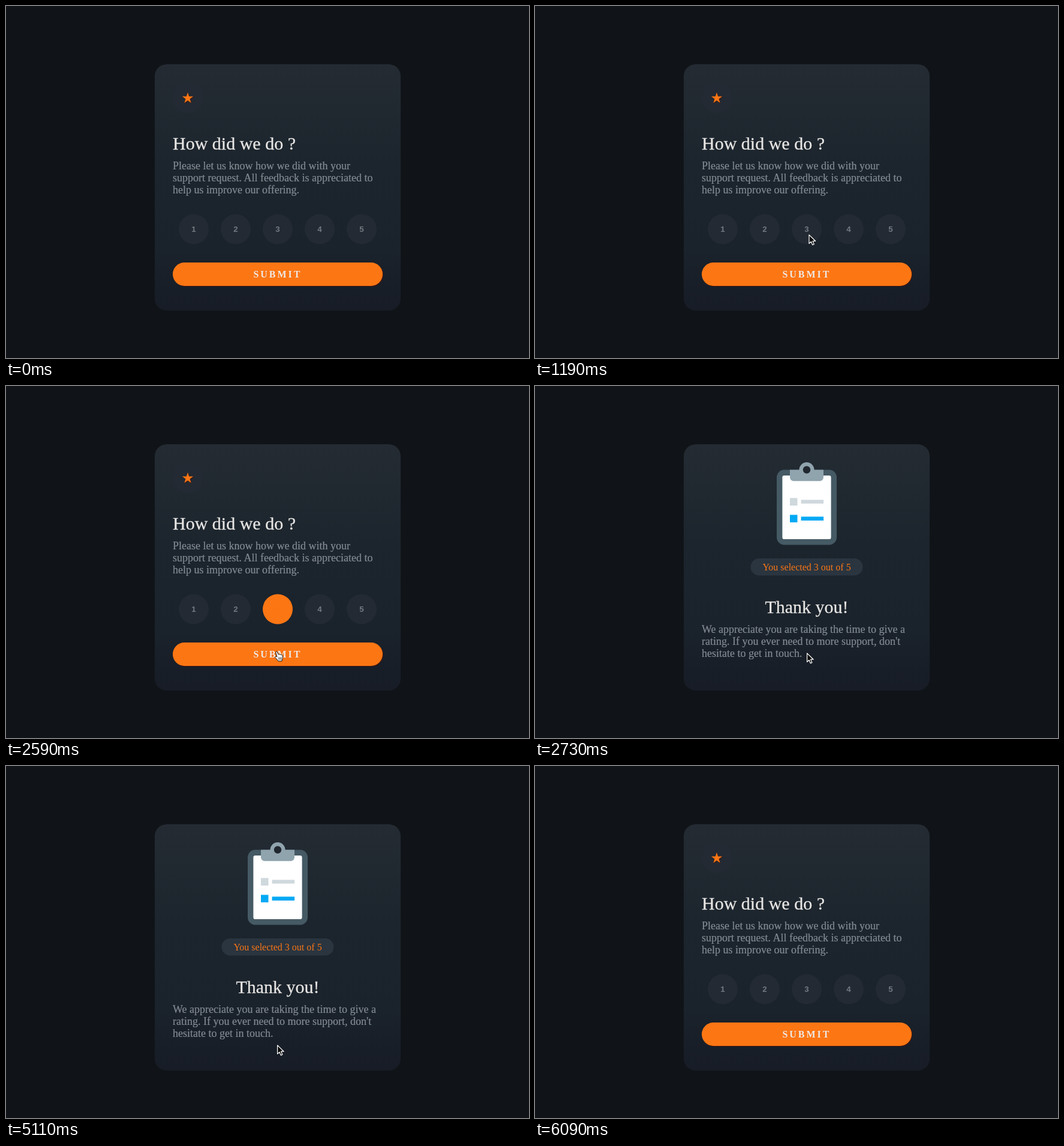
An HTML page that plays this animation: 872 px wide and 586 px high, repeating every 6370 ms.

```html
<!DOCTYPE html>
<html lang="en">
<head>
<meta charset="utf-8">
<title>Rating card</title>
<style>
  html, body { margin: 0; width: 100%; height: 100%; overflow: hidden; background: #101418; }
  svg { display: block; width: 100vw; height: 100vh; }
  text { font-family: "Liberation Serif", "Times New Roman", serif; white-space: pre; }
  .title { font-size: 30px; fill: #e8e6e4; stroke: #e8e6e4; stroke-width: .3px; }
  .body { font-size: 18px; fill: #838a93; stroke: #838a93; stroke-width: .2px; }
  .digit { font: bold 13.33px "Liberation Sans", Arial, sans-serif; text-anchor: middle; }
  .submit { font-size: 16px; font-weight: bold; letter-spacing: 3px; fill: #eeeae6; }
  .pill { font-size: 16px; fill: #fc7614; text-anchor: middle; }
</style>
</head>
<body>
<svg viewBox="0 0 872 586">
  <defs>
    <linearGradient id="cardFill" x1="0" y1="0" x2="0" y2="1">
      <stop offset="0" stop-color="#242b33"/>
      <stop offset=".4" stop-color="#1c252d"/>
      <stop offset=".76" stop-color="#1a222b"/>
      <stop offset="1" stop-color="#171c26"/>
    </linearGradient>
    <filter id="shade" x="-20%" y="-20%" width="140%" height="140%" color-interpolation-filters="sRGB">
      <feDropShadow dx="1" dy="1" stdDeviation=".6" flood-color="#4a140c" flood-opacity=".8"/>
    </filter>
  </defs>
  <rect width="872" height="586" fill="#101418"/>
  <rect x="248" y="97" width="410" height="410" rx="20" fill="url(#cardFill)"/>

  <g id="form">
    <circle cx="303" cy="153" r="25" fill="#232a33"/>
    <polygon id="star" fill="#fc7614" filter="url(#shade)"/>
    <text class="title" x="278" y="239">How did we do ?</text>
    <g id="ask" class="body"></g>
    <g id="ratings"></g>
    <rect x="278" y="427" width="350" height="39" rx="19.5" fill="#fc7614" filter="url(#shade)"/>
    <text class="submit" x="412.4" y="452">SUBMIT</text>
  </g>

  <g id="thanks">
    <rect x="403" y="139.5" width="100" height="125" rx="12.5" fill="#455a64"/>
    <rect x="412.4" y="148.9" width="81.2" height="106.2" rx="3.1" fill="#fff"/>
    <g fill="#90a4ae">
      <path d="M425 139.5h56v12.5a6.2 6.2 0 0 1-6.2 6.2h-43.6a6.2 6.2 0 0 1-6.2-6.2z"/>
      <circle cx="453" cy="139.5" r="12.5"/>
    </g>
    <circle cx="453" cy="139.5" r="6.2" fill="#20272f"/>
    <path d="M425 186.4h12.5v12.5H425zM443.6 189.5h37.5v6.3h-37.5z" fill="#cfd8dc"/>
    <path d="M425 214.5h12.5v12.5H425zM443.6 217.6h37.5v6.3h-37.5z" fill="#03a9f4"/>
    <rect x="359.5" y="287" width="187" height="28.5" rx="14.25" fill="#2a3540"/>
    <text class="pill" x="453" y="307">You selected 3 out of 5</text>
    <text class="title" x="453" y="378" text-anchor="middle">Thank you!</text>
    <g id="reply" class="body"></g>
  </g>

  <g id="pointer">
    <path id="arrow" d="M.6 .9V15.4L4 12.2 6.3 17.6 8.9 16.5 6.6 11.2H11.2Z"
      fill="#0a0a0a" stroke="#fff" stroke-width="1.2" stroke-linejoin="round"/>
    <g id="hand" transform="translate(-5 -3)" stroke="#111" stroke-linejoin="round" stroke-linecap="round">
      <path d="M3.9 9.8L1.8 3C1.3 1 3.8 .1 4.5 2L6 6.1C6.7 5 8.2 5.2 8.5 6.4C9.3 5.5 10.7 5.8 11 7C11.9 6.3 13.2 6.8 13.2 8.2V11.4C13.2 13 12.2 14 12 16.9H5.6C5 14.8 2.8 13.2 1 11.2C-.1 9.8 1.7 8.6 2.8 9.4Z" fill="#fff"/>
      <path d="M6.8 10.8v3.6M8.8 10.8v3.6M10.8 10.8v3.6" fill="none" stroke-width=".8"/>
    </g>
  </g>
</svg>
<script>
const LOOP = 6370, STEP = 70, SENT = 2730, RELOADED = 5600;
const $ = id => document.getElementById(id);

function add(parent, tag, attrs, text = "") {
  const node = document.createElementNS("http://www.w3.org/2000/svg", tag);
  for (const key in attrs) node.setAttribute(key, attrs[key]);
  node.textContent = text;
  return parent.appendChild(node);
}

function addLines(parent, y, lines) {
  lines.forEach((line, i) => add(parent, "text", { x: 278, y: y + 20 * i }, line));
}

addLines($("ask"), 272, [
  "Please let us know how we did with your",
  "support request. All feedback is appreciated to",
  "help us improve our offering."
]);
addLines($("reply"), 411, [
  "We appreciate you are taking the time to give a",
  "rating. If you ever need to more support, don't",
  "hesitate to get in touch."
]);

$("star").setAttribute("points", Array.from({ length: 10 }, (_, i) => {
  const r = i % 2 ? 3.67 : 9.6, a = i * Math.PI / 5;
  return [303 + r * Math.sin(a), 153.5 - r * Math.cos(a)].map(v => v.toFixed(2));
}).join(" "));

const ratings = [1, 2, 3, 4, 5].map(n => {
  const x = 243 + 70 * n;
  return {
    disc: add($("ratings"), "circle", { cx: x, cy: 371.5, r: 25, fill: "#232a33" }),
    digit: add($("ratings"), "text", { x, y: 376, class: "digit", fill: "#727981" }, n)
  };
});

const within = (t, from, to) => t >= from && t < to;
const progress = (t, from, to) => Math.min(1, Math.max(0, (t - from) / (to - from)));
const mix = (a, b, k) => a.map((v, i) => v + (b[i] - v) * k);
const show = (node, on) => node.setAttribute("visibility", on ? "visible" : "hidden");

// Each move starts where the last one ended; via bends it
const entry = [459, 600];
const moves = [
  { from: 140, to: 840, end: [438, 455] },
  { from: 840, to: 1330, via: [463, 379], end: [454, 369] },
  { from: 2030, to: 2310, end: [453, 444] },
  { from: 4130, to: 4620, via: [446, 482], end: [409, 592] },
  { from: 4620, to: 5110, end: [452, 464] },
  { from: 5740, to: 6090, end: [418, 600] }
];

function pointerAt(t) {
  return moves.reduce((pos, { from, to, end, via = mix(pos, end, .5) }) => {
    const k = progress(t, from, to);
    return mix(mix(pos, via, k), mix(via, end, k), k);
  }, entry);
}

const orange = [252, 118, 20], slate = [35, 42, 51], gray = [114, 121, 129];

function draw(time) {
  const t = Math.floor(time % LOOP / STEP) * STEP;
  const thanks = within(t, SENT, RELOADED);
  show($("form"), !thanks);
  show($("thanks"), thanks);

  const picked = t < SENT ? progress(t, 1610, 1820) : 0;
  ratings[2].disc.setAttribute("fill", `rgb(${mix(slate, orange, picked)})`);
  ratings[2].digit.setAttribute("fill", `rgb(${mix(gray, orange, picked)})`);

  const hand = within(t, 770, 910) || within(t, 1330, SENT);
  show($("hand"), hand);
  show($("arrow"), !hand);
  $("pointer").setAttribute("transform", `translate(${pointerAt(t)})`);
}

const start = performance.now();
function tick() {
  draw(performance.now() - start);
  requestAnimationFrame(tick);
}
tick();
</script>
</body>
</html>
```
